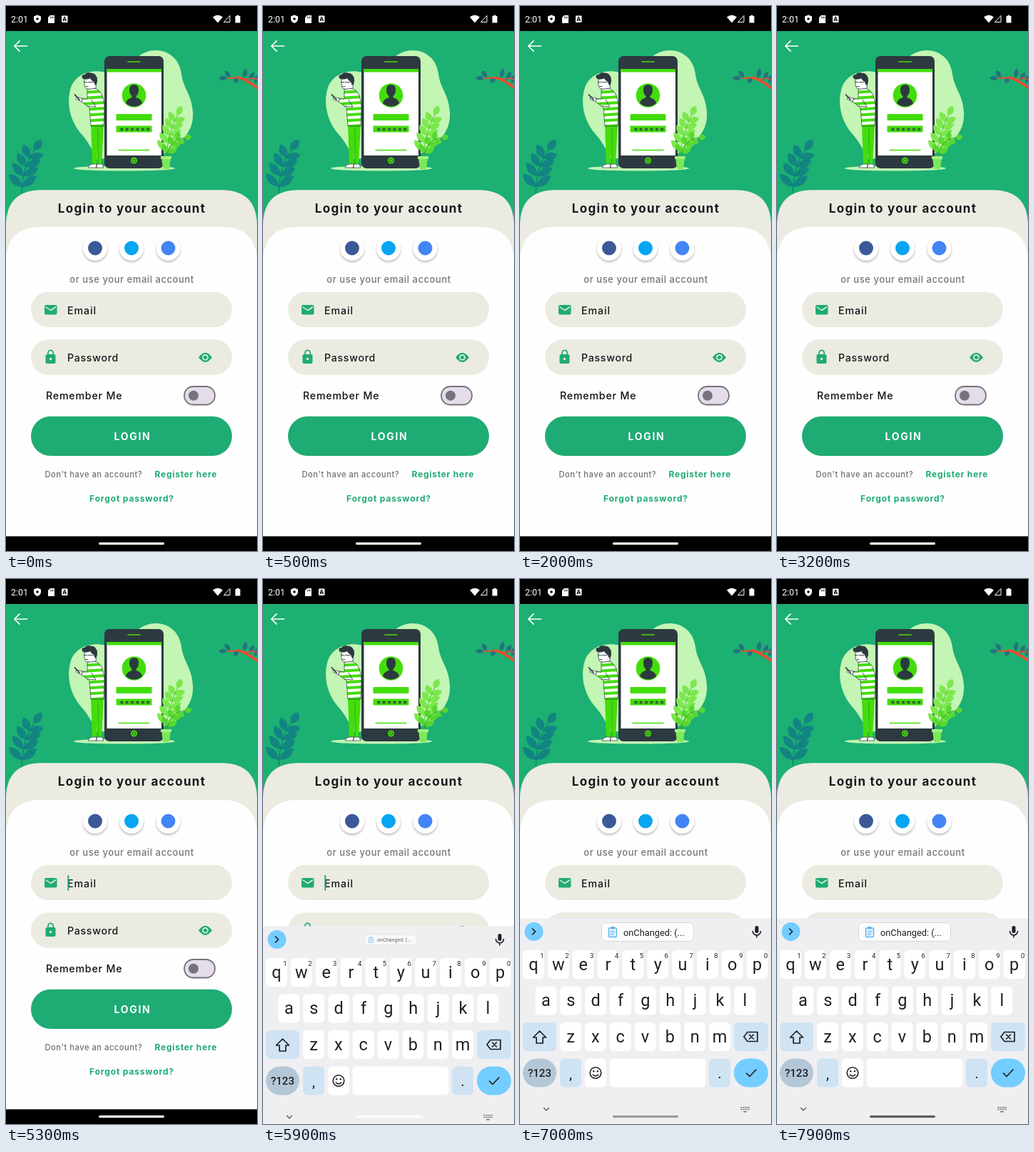
An HTML page for the animation above (8 s loop, 352x762 px).

```html
<!DOCTYPE html>
<html lang="en">
<head>
<meta charset="utf-8">
<title>Login screen</title>
<style>
  html, body { margin: 0; width: 100%; height: 100%; overflow: hidden; background: #000; }
  svg { display: block; width: 100%; height: 100%; font-family: Inter, sans-serif; }
  .line { fill: none; stroke-linecap: round; stroke-linejoin: round; }
  .shadow { filter: drop-shadow(0 2px 1.5px #0004); }
</style>
</head>
<body>
<svg id="stage" viewBox="0 0 352 762"></svg>
<script>
const GREEN = '#1cb072', ACCENT = '#1fab74', BEIGE = '#ebebe2', INK = '#2d3940', LIME = '#43dd0c',
      PALE = '#c3f5b4', TEAL = '#128582', KEY_BLUE = '#cfe3f3', SKY = '#74cdff', DARK = '#1d1f22';

const rect = (x, y, w, h, fill, r = 0, extra = '') =>
  `<rect x="${x}" y="${y}" width="${w}" height="${h}" rx="${r}" fill="${fill}" ${extra}/>`;
const circle = (x, y, r, fill, extra = '') => `<circle cx="${x}" cy="${y}" r="${r}" fill="${fill}" ${extra}/>`;
const path = (d, fill, extra = '') => `<path d="${d}" fill="${fill}" ${extra}/>`;
const line = (d, color, width = 1.6) => `<path class="line" d="${d}" stroke="${color}" stroke-width="${width}"/>`;
const text = (s, x, y, size, fill, weight = 400, spacing = 0, anchor = 'start', font = 'inherit') =>
  `<text x="${x}" y="${y}" font-size="${size}" fill="${fill}" font-weight="${weight}" letter-spacing="${spacing}" text-anchor="${anchor}" font-family="${font}">${s}</text>`;
const ROBOTO = 'Roboto, sans-serif';

const leaf = (x, y, angle, length, width, fill) =>
  path(`M0 0Q${length * .5} ${-width} ${length} 0Q${length * .5} ${width} 0 0`, fill,
       `transform="translate(${x} ${y}) rotate(${angle})"`);

// A stem along a quadratic curve with paired leaves and one at the tip.
function frond([x0, y0], [cx, cy], [x1, y1], pairs, length, width, fill, stem = fill) {
  let out = '';
  for (let i = 0; i <= pairs; i++) {
    const t = .14 + .86 * i / pairs, u = 1 - t;
    const x = u * u * x0 + 2 * u * t * cx + t * t * x1, y = u * u * y0 + 2 * u * t * cy + t * t * y1;
    const angle = Math.atan2(u * (cy - y0) + t * (y1 - cy), u * (cx - x0) + t * (x1 - cx)) * 180 / Math.PI;
    const size = length * (1 - .3 * t);
    out += i === pairs ? leaf(x, y, angle, size, width, fill)
      : leaf(x, y, angle - 50, size, width, fill) + leaf(x, y, angle + 50, size, width, fill);
  }
  return out + line(`M${x0} ${y0}Q${cx} ${cy} ${x1} ${y1}`, stem, 1);
}

function statusBar() {
  return text('2:01', 7, 22.5, 12.5, '#fff', 400, 0, 'start', ROBOTO)
    + path('M44 12.5l5 2v3.5q0 4-5 6-5-2-5-6v-3.5z', '#fff') + circle(44, 18, 1.8, '#000')
    + path('M62 13h6v11h-9v-8z', '#fff') + line('M62.5 15v2M64.5 15v2M66.3 15v2', '#000', .8)
    + rect(78, 13.5, 8.5, 9.5, '#fff', 1) + text('A', 82.2, 21.2, 8, '#000', 700, 0, 'middle')
    + path('M290 15.5q7-5.5 14 0l-7 8z', '#fff')
    + path('M305.5 22.5h8.5v-9z', 'none', 'stroke="#fff"')
    + path('M321.5 14h2v-1.3h3V14h2v9.5h-7z', '#fff');
}

function scenery() {
  const twigs = [[310, 101, 180, 12], [314, 100, 235, 12], [326, 101, 140, 9], [334, 101, 280, 14],
                 [341, 104, 300, 14], [349, 108, 290, 13]];
  return frond([22, 263], [22, 225], [39, 202], 4, 27, 11, TEAL, '#0e6f78')
    + twigs.map(([x, y, a, l]) => leaf(x, y, a, l, 6.5, '#23747c')).join('')
    + line('M311 101L328 100L337 104', '#f04a30', 2) + line('M326 100Q338 103 353 115', '#f04a30', 3.4)
    + line('M334 103L345 101L353 103', '#f04a30', 1.6);
}

function person() {
  const torso = 'M114 117Q121 113 129 117Q137 123 138 141L137 168H119L117 142L106 134L107 129L114 130Z';
  let stripes = '';
  for (let y = 120; y < 170; y += 8) stripes += line(`M104 ${y + 1}L140 ${y - 1}`, LIME, 4);
  return `<clipPath id="torso"><path d="${torso}"/></clipPath>`
    + path('M119 166H137L134 222H128L129 190L127 222H121Z', LIME)
    + line('M129 172V220', '#2b9b18', .8)
    + path('M121 221h6v5h-12q1-4 6-5M128 221h7l2 5h-11z', '#fff', `stroke="${INK}" stroke-width=".7"`)
    + path(torso, '#fff') + `<g clip-path="url(#torso)">${stripes}</g>`
    + path(torso, 'none', `stroke="${INK}" stroke-width=".7"`)
    + line('M120 131L126 141L114 140', INK, .8)
    + path('M107 129L99 127L98 130L106 134Z', '#fff', `stroke="${INK}" stroke-width=".7"`)
    + line('M96.5 124L103 131', INK, 1.8)
    + path('M110 102Q109 113 113 116H119L126 115L127 105L122 100Z', '#fff', `stroke="${INK}" stroke-width=".8"`)
    + path('M107 101Q105 96 110 96Q113 92 119 93.5Q128 94 128 104Q128 109 125 111L123 106L120 104L118 101Q112 104 107 101Z', INK)
    + line('M109.5 106.5h4M115 106.5h7M112 112.5h3', INK, .9);
}

function illustration() {
  return path('M140 93C117 87 97 97 91 114C84 136 90 160 104 177C116 190 120 200 128 214L221 206C245 192 264 177 262 148C260 122 249 117 246 95C242 62 207 53 185 71Z', PALE)
    + `<ellipse cx="166" cy="227" rx="71" ry="3.6" fill="${PALE}"/>`
    + person()
    + rect(138, 70, 83, 157, INK, 7) + rect(141.5, 88, 76.5, 121, '#fff') + rect(141.5, 88, 76.5, 4.5, LIME)
    + line('M171 78H188', LIME, 1.7) + circle(179.5, 216, 4.5, LIME)
    + rect(177.5, 214, 4, 4, 'none', 1, `stroke="${INK}" stroke-width=".8"`)
    + circle(179.5, 125, 16.8, LIME)
    + path('M173 117Q173 110 179.5 110Q186 110 186 117Q186 123 182.5 126V128Q190 130 191 136Q180 145 168 136Q169 130 176.5 128V126Q173 123 173 117Z', INK)
    + rect(154.5, 151, 50, 9, LIME, 1) + rect(154.5, 167.5, 50, 9, LIME, 1)
    + text('******', 159.5, 178, 11, INK, 700, 1.6, 'start', 'DejaVu Sans, sans-serif')
    + line('M158 201.5H201', LIME, 1.3)
    + frond([224, 212], [228, 178], [240, 153], 5, 21, 9, '#7ce84d', '#45c229')
    + frond([225, 212], [230, 186], [250, 184], 3, 15, 8, '#57d733', '#369f22')
    + path('M218 211H231L229 228H220Z', '#7ee85b') + rect(217, 210, 15, 4, '#a0f27f');
}

function loginForm() {
  const panel = (y, fill) => path(`M0 741.3V${y + 50}Q0 ${y} 50 ${y}H302Q352 ${y} 352 ${y + 50}V741.3Z`, fill);
  const badge = (x, color) => circle(x, 339, 17, '#fff', 'class="shadow"') + circle(x, 338.5, 10, color);
  return panel(257.3, BEIGE) + panel(308.7, '#fefefe')
    + text('Login to your account', 176.5, 289, 17, '#17171c', 700, 1.3, 'middle')
    + badge(125, '#3b5998') + badge(176, '#08a5f2') + badge(227.5, '#4285f4')
    + text('or use your email account', 176.5, 387, 13, '#76767a', 500, .55, 'middle')
    + rect(35, 399.7, 282, 49.3, BEIGE, 24.6) + rect(35, 466.3, 282, 49.5, BEIGE, 24.7)
    + rect(54, 418, 17.5, 13.5, ACCENT, 2) + line('M56 421l6.7 4.5 6.8-4.5', BEIGE, 1.5)
    + rect(55.5, 487, 14, 13, ACCENT, 2) + line('M59 487v-2a3.6 3.6 0 0 1 7.2 0v2', ACCENT, 1.8) + circle(62.5, 493.5, 1.7, BEIGE)
    + path('M270 491.3Q279.5 478 289 491.3Q279.5 504.6 270 491.3Z', ACCENT) + circle(279.5, 491.3, 4.3, BEIGE) + circle(279.5, 491.3, 2.6, ACCENT)
    + text('Email', 86, 430.5, 14.2, '#17171c', 450, .9)
    + text('Password', 86, 497, 14.2, '#17171c', 450, .7)
    + text('Remember Me', 56, 550, 14.2, '#111116', 450, .8)
    + rect(250, 532, 43, 25.5, '#e5dcea', 12.75, 'stroke="#757179" stroke-width="1.8"') + circle(263, 544.7, 7, '#77737b')
    + rect(35, 573.7, 282, 55.3, ACCENT, 27.6)
    + text('LOGIN', 177.5, 607, 14, '#fff', 700, 1.7, 'middle')
    + text("Don't have an account?", 54.5, 659, 11.2, '#707074', 450, .5)
    + text('Register here', 208.5, 659, 12, ACCENT, 700, .75)
    + text('Forgot password?', 176.5, 693, 12, ACCENT, 700, .85, 'middle');
}

function keyboard() {
  const key = (x, y, w, fill = '#fff', r = 6) => rect(x, y, w, 40, fill, r);
  const label = (s, x, y, size, weight = 400) => text(s, x, y, size, DARK, weight, 0, 'middle', ROBOTO);
  const letters = (row, x0, y, digits) => [...row].map((c, i) => {
    const x = x0 + i * 34.85;
    return key(x - 15, y, 30) + label(c, x, y + 27.5, 23.5)
      + (digits ? label((i + 1) % 10, x + 12, y + 11, 9.5) : '');
  }).join('');
  let dots = '';
  for (let i = 0; i < 10; i++) dots += rect(309.5 + i % 5 * 2.7, 738 + (i / 5 | 0) * 2.8, 1.5, 1.5, '#555');
  const chip = rect(-64.5, -13, 129, 26, '#fdfdfe', 6, 'stroke="#d6d7dc"')
    + rect(-54.5, -5.5, 11, 12.5, '#e9f6ff', 1.5, 'stroke="#55b4ec" stroke-width="1.4"') + rect(-51.5, -7.5, 5, 3.5, '#55b4ec', 1)
    + line('M-52 -1h6M-52 1.5h6M-52 4h4', '#55b4ec', 1)
    + text('onChanged: (...', -34, 5, 12.8, DARK, 400, 0, 'start', ROBOTO);
  return rect(0, 474.5, 352, 300, '#efeff2')
    + circle(19.5, 493, 13, SKY) + line('M17.5 489l4 4-4 4', DARK, 1.7)
    + `<g id="chip">${chip}</g>`
    + rect(329.5, 485, 5, 10, DARK, 2.5) + line('M326.5 492.5a5.5 5.5 0 0 0 11 0M332 498.5v2.5', DARK, 1.6)
    + letters('qwertyuiop', 19, 519, true) + letters('asdfghjkl', 36.5, 569.5) + letters('zxcvbnm', 71, 620)
    + key(4, 620, 47, KEY_BLUE) + path('M27.5 632l9 9h-4.5v8h-9v-8h-4.5z', 'none', `stroke="${DARK}" stroke-width="1.7" stroke-linejoin="round"`)
    + key(300, 620, 48, KEY_BLUE) + path('M319 633.5h14v13h-14l-5-6.5z', 'none', `stroke="${DARK}" stroke-width="1.7"`)
    + line('M321.5 637l6 6M327.5 637l-6 6', DARK)
    + key(4, 670.5, 47, '#b4c7d7', 20) + label('?123', 27.5, 696, 15, 500)
    + key(56, 670.5, 30, KEY_BLUE) + label(',', 71, 699, 21)
    + key(91, 670.5, 30) + circle(106, 690.5, 7.8, 'none', `stroke="${DARK}" stroke-width="1.6"`)
    + circle(103.2, 688.3, 1.2, DARK) + circle(108.8, 688.3, 1.2, DARK) + line('M102.2 693q3.8 4 7.6 0', DARK, 1.5)
    + key(125.5, 670.5, 135) + key(265, 670.5, 30, KEY_BLUE) + label('.', 280, 698, 21)
    + key(300, 670.5, 48, SKY, 20) + line('M317.5 691l4.5 4.5 9-9.5', DARK, 1.7)
    + line('M33.5 739.5l3.5 3.5 3.5-3.5', '#555', 1.3) + dots + line('M313.5 744.8h4', '#555', 1.2);
}

document.getElementById('stage').innerHTML =
  rect(0, 0, 352, 762, '#000') + statusBar() + rect(0, 35, 352, 706, GREEN)
  + scenery() + line('M12 56H29.5M19 48.8L11.8 56L19 63.2', '#fff', 1.7)
  + illustration() + loginForm()
  + rect(86.3, 414, 1.9, 21.5, ACCENT, 0, 'id="caret"')
  + `<g id="keyboard">${keyboard()}</g>`
  + rect(130, 750, 92, 3.2, '#fff', 1.6, 'id="handle"');

const [caret, board, chip, handle] = ['caret', 'keyboard', 'chip', 'handle'].map(id => document.getElementById(id));
const LOOP = 8000, STEP = 100, KEYBOARD_IN = 5900;
const caretToggles = [5300, 6000, 6300, 6800, 7200, 7700];
const handleShades = [[6600, 190], [7000, 155], [7200, 130], [7500, 110], [7900, 92]];
const show = (el, on) => el.setAttribute('visibility', on ? 'visible' : 'hidden');

function render(now) {
  const t = Math.floor(now % LOOP / STEP) * STEP;
  show(caret, caretToggles.filter(at => at <= t).length % 2);

  show(board, t >= KEYBOARD_IN);
  const rest = (1 - Math.min(1, Math.max(0, (t - KEYBOARD_IN) / 200))) ** 3;
  board.setAttribute('transform', `translate(0 ${11 * rest})`);
  chip.setAttribute('transform', `translate(179 493.5) scale(${1 - .44 * rest})`);
  chip.setAttribute('opacity', 1 - .35 * rest);

  const shade = handleShades.reduce((value, [at, next]) => t >= at ? next : value, 255);
  handle.setAttribute('fill', `rgb(${shade},${shade},${shade})`);
}

const start = performance.now();
function tick() {
  render(performance.now() - start);
  requestAnimationFrame(tick);
}
tick();
</script>
</body>
</html>
```
